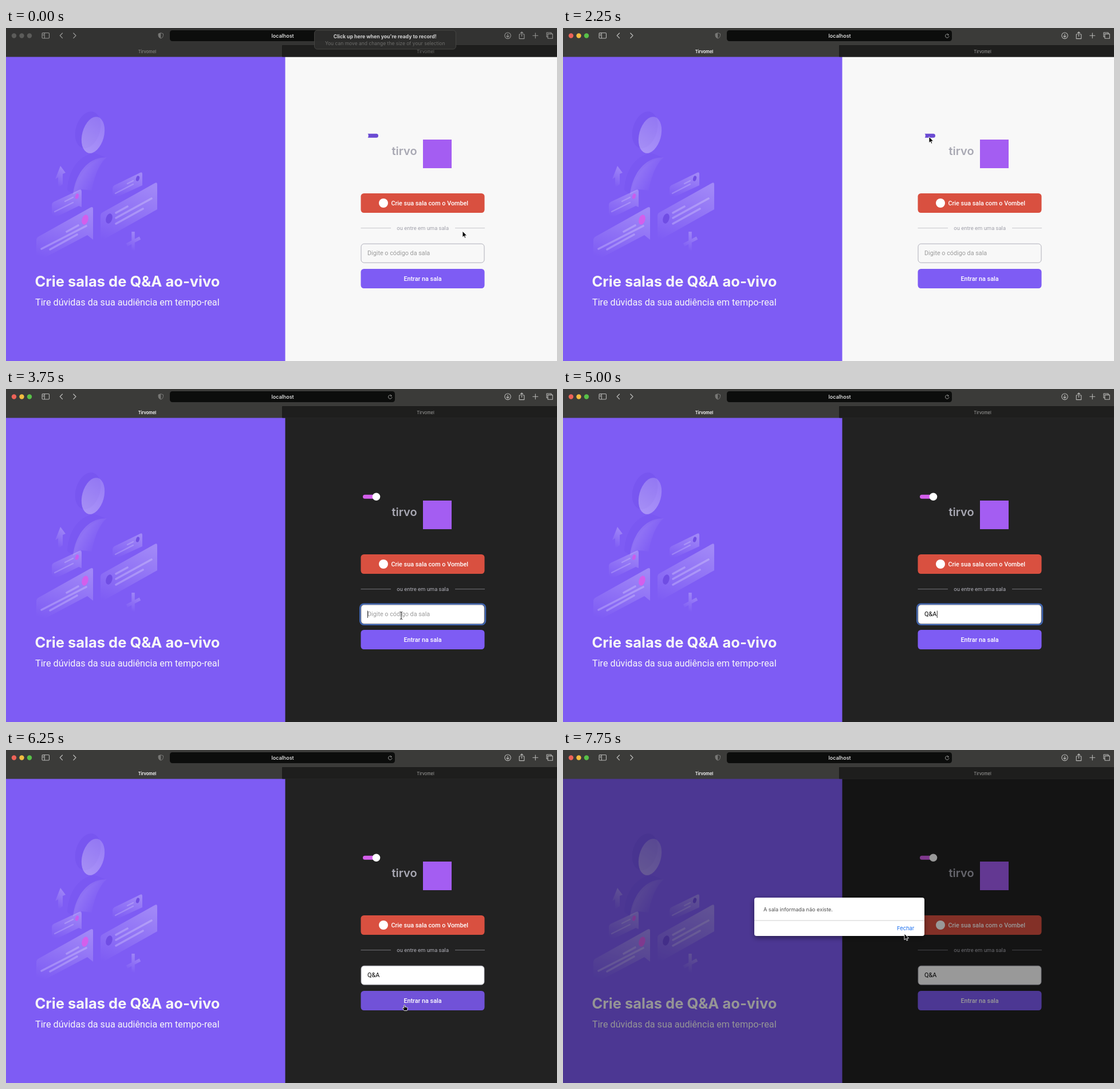
Animation of 962x582 px, one loop 8000 ms. Source, as an HTML page:

```html
<!DOCTYPE html>
<html lang="pt">
<head>
<meta charset="utf-8">
<title>Tirvomel</title>
<style>
html, body { margin: 0; width: 100%; height: 100%; overflow: hidden; background: #222; }
svg { display: block; width: 962px; height: 582px; }
text { font-family: Roboto, sans-serif; }
.ui { font-family: Inter, sans-serif; }
.mid { text-anchor: middle; }
</style>
</head>
<body>
<svg viewBox="0 0 962 582" xmlns="http://www.w3.org/2000/svg">
  <defs>
    <linearGradient id="fade" x1=".7" y1="0" x2=".4" y2="1">
      <stop offset="0" stop-color="#fff" stop-opacity=".27"/>
      <stop offset="1" stop-color="#fff" stop-opacity="0"/>
    </linearGradient>
    <linearGradient id="body" x1="0" y1=".2" x2=".75" y2=".65">
      <stop offset="0" stop-color="#fff" stop-opacity=".24"/>
      <stop offset="1" stop-color="#fff" stop-opacity="0"/>
    </linearGradient>
    <linearGradient id="head" x1=".6" y1="0" x2=".4" y2="1">
      <stop offset="0" stop-color="#fff" stop-opacity=".2"/>
      <stop offset="1" stop-color="#fff" stop-opacity=".34"/>
    </linearGradient>
    <filter id="shadow" x="-20%" y="-50%" width="140%" height="220%">
      <feDropShadow dx="0" dy="3" stdDeviation="5" flood-opacity=".45"/>
    </filter>
  </defs>

  <rect y="50" width="488" height="532" fill="#7e5cf4"/>
  <g id="art">
    <ellipse cx="143" cy="178" rx="21" ry="33" transform="rotate(17 143 178)" fill="#4a2bd0" opacity=".11"/>
    <ellipse cx="152" cy="187" rx="19" ry="32.5" transform="rotate(15 152 187)" fill="url(#head)"/>
    <path d="M107 283C108 250 128 220 156 219L174 226C145 230 125 258 117 291Z" fill="#4a2bd0" opacity=".08"/>
    <path d="M117 291C120 260 140 225 176 226C163 236 153 262 150 284L132 282Z" fill="url(#body)"/>
    <path d="M95 241L104 253L99 255V273L91 279V261L86 264Z" fill="url(#fade)"/>
    <path d="M80 309Q80 306 83 304L128 283Q132 281 132 286V313L127 311L80 334Z" fill="url(#fade)"/>
    <path d="M53 370Q53 367 56 365L147 314Q152 311 152 316V370L142 362L53 409Z" fill="url(#fade)"/>
    <path d="M165 328Q165 324 169 322L260 271Q264 269 264 273V317L175 367L165 382Z" fill="url(#fade)"/>
    <path d="M186 280Q186 277 189 275L234 253Q238 251 238 255V275L186 299Z" fill="url(#fade)"/>
    <path d="M222 356V389M211 379L234 367" stroke="url(#fade)" stroke-width="5.5" fill="none"/>
    <path d="M106 356L126 345M62 386L140 346M77 387L124 361M192 323L212 312M192 332L254 298M192 342L239 316"
      stroke="#fff" stroke-opacity=".23" stroke-width="3.6" stroke-linecap="round"/>
    <path d="M103 303L117 296M85 321L117 305M212 272L222 267M191 289L222 273"
      stroke="#fff" stroke-opacity=".2" stroke-width="2.4" stroke-linecap="round"/>
    <ellipse cx="138" cy="335" rx="5.4" ry="9" transform="rotate(17 138 335)" fill="#d35fec"/>
    <ellipse cx="124" cy="294" rx="2.9" ry="4.8" transform="rotate(17 124 294)" fill="#c95dee"/>
    <ellipse cx="180" cy="333" rx="5.4" ry="9" transform="rotate(17 180 333)" fill="#704de4"/>
    <ellipse cx="230" cy="263" rx="2.9" ry="4.8" transform="rotate(17 230 263)" fill="#704de4"/>
  </g>
  <text class="ui" x="50.5" y="452" font-size="25.5" font-weight="700" fill="#f8f8f8">Crie salas de Q&amp;A ao-vivo</text>
  <text x="51" y="485" font-size="16.2" fill="#f8f8f8">Tire dúvidas da sua audiência em tempo-real</text>

  <rect id="panel" x="487.5" y="50" width="474.5" height="532"/>
  <rect id="track" x="623" y="184.8" width="27" height="7" rx="3.5"/>
  <circle id="knob" cy="188.3" r="6.8"/>
  <text class="ui" x="673.5" y="222" font-size="20" font-weight="600" fill="#a8a8b3">tirvo</text>
  <rect x="728" y="195" width="50" height="50" fill="#a45df2"/>
  <rect x="619.5" y="289" width="216" height="34" rx="5.4" fill="#d95040"/>
  <circle cx="659" cy="306" r="8" fill="#fff"/>
  <text x="672.5" y="309.8" font-size="10.8" font-weight="500" fill="#fff">Crie sua sala com o Vombel</text>
  <path id="rules" d="M619.5 349.7H672M784 349.7H836" stroke-width="1"/>
  <text id="or" class="mid" x="727.7" y="353" font-size="9.45">ou entre em uma sala</text>
  <rect id="ring" x="618.2" y="375.7" width="218.8" height="36" rx="6.5" fill="none" stroke="#3f66b4" stroke-width="2.4"/>
  <rect id="box" x="620" y="377.2" width="215" height="33" rx="5.2" stroke="#a8a8b3" stroke-width=".9"/>
  <text id="entry" x="631" y="397.4" font-size="10.8"></text>
  <path id="caret" stroke="#000" stroke-width=".8"/>
  <rect id="enter" x="619.5" y="421" width="216" height="34" rx="5.4"/>
  <text class="mid" x="727.5" y="441.9" font-size="10.8" font-weight="500" fill="#fff">Entrar na sala</text>

  <g id="modal">
    <rect y="50" width="962" height="532" opacity=".4"/>
    <rect x="334" y="258" width="297" height="67" rx="4" fill="#fff" filter="url(#shadow)"/>
    <path d="M334 298H631" stroke="#cfcfcf" stroke-width="1"/>
    <text class="ui" x="350" y="282.3" font-size="9.1" fill="#4c4c4c">A sala informada não existe.</text>
    <text class="ui" x="583" y="315.4" font-size="9.4" fill="#1a6ff0">Fechar</text>
  </g>

  <rect id="bar" width="962" height="50.5"/>
  <path d="M482.5 30.5H962V50.5H482.5Z" fill="#1e1e1d"/>
  <path d="M482.5 30.5H962M482.5 30.5V50" stroke="#141414" stroke-width=".7" fill="none"/>
  <g id="lights"><circle cx="14"/><circle cx="27.5"/><circle cx="41"/></g>
  <rect x="286" y="4" width="393" height="19" rx="4.5" fill="#0c0d0c"/>
  <g id="icons" fill="none" stroke-width="1.1" stroke-linecap="round" stroke-linejoin="round">
    <path d="M64.5 8.5H74Q75.5 8.5 75.5 10V16.5Q75.5 18 74 18H64.5Q63 18 63 16.5V10Q63 8.5 64.5 8.5M67.3 8.5V18M64.5 11H65.8M64.5 13H65.8"/>
    <path d="M98.5 9L94.3 13.3L98.5 17.6M117.8 9L122 13.3L117.8 17.6" stroke-width="1.3"/>
    <circle cx="876" cy="13.3" r="5.3"/>
    <path d="M876 10.5V16M873.8 14L876 16.1L878.2 14"/>
    <path d="M898.2 11H896.2V18.6H904.8V11H902.8M900.5 14.5V6.8M898.3 9L900.5 6.8L902.7 9"/>
    <path d="M924.3 8.8V17.8M919.8 13.3H928.8"/>
    <path d="M946 15.5H944V8H952V10M946 10.4H954.3V18.3H946Z"/>
  </g>
  <path d="M270.3 8.5L274.5 10V13.5Q274.2 16.8 270.3 18.3Q266.4 16.8 266.1 13.5V10Z" fill="none" stroke="#777775"/>
  <path d="M270.3 8.5V18.3Q266.4 16.8 266.1 13.5V10Z" fill="#777775"/>
  <path d="M673.2 11.9A3.2 3.2 0 1 0 673.9 14.2M671 10.2L673.3 11.9L671.4 13.2" fill="none" stroke="#a9a9a7" stroke-width=".9"/>
  <text class="ui mid" x="483" y="17.3" font-size="9" font-weight="500" fill="#f2f2f2">localhost</text>
  <text id="tab" class="ui mid" x="246.5" y="43.5" font-size="7.4" font-weight="600">Tirvomel</text>
  <text id="tab2" class="ui mid" x="732.5" y="43.5" font-size="7.4">Tirvomel</text>

  <g id="tip">
    <rect x="538.5" y="4" width="247" height="33" rx="5" fill="#2d2d2c" fill-opacity=".94" stroke="#4c4c4a" stroke-width=".8"/>
    <text class="ui mid" x="661.7" y="18" font-size="8.7" font-weight="700" fill="#d2d2d2">Click up here when you're ready to record!</text>
    <text class="ui mid" x="661.7" y="30" font-size="8.5" fill="#6c6c6a">You can move and change the size of your selection</text>
  </g>

  <g id="cursor" stroke-linejoin="round">
    <path id="arrow" d="M0 0V10.8L2.5 8.5L4.1 12.2L5.9 11.4L4.3 7.9H7.7Z" fill="#000" stroke="#fff" stroke-width=".9"/>
    <path id="beam" d="M-2.2 -6.5Q0 -6.5 0 -5V5Q0 6.5 -2.2 6.5M2.2 -6.5Q0 -6.5 0 -5M0 5Q0 6.5 2.2 6.5" fill="none" stroke="#222" stroke-width="1"/>
    <path id="hand" d="M-.2 10L-3.2 6Q-3.4 4.6 -1.8 5L-.8 6V.8Q0 -.4 .9 .8V3.8Q2 3 2.6 4Q3.7 3.4 4.1 4.4Q5.6 4.2 5.6 5.6Q5.6 8.4 4.6 10Z" fill="#000" stroke="#fff" stroke-width=".9"/>
  </g>
</svg>
<script>
const LOOP = 8000, STEP = 250;
const $ = id => document.getElementById(id);
const set = (id, attrs) => { for (const k in attrs) $(id).setAttribute(k, attrs[k]); };
const show = (id, on) => set(id, { visibility: on ? 'visible' : 'hidden' });

// time, x, y of the pointer
const path = [
  [0, 797, 355], [1250, 690, 245], [2000, 639, 190], [2500, 639, 190],
  [3500, 690, 396], [5250, 690, 396], [5500, 745, 466], [5750, 714, 450],
  [6250, 695.5, 445.5], [6750, 695.5, 445.5], [7750, 596, 321]
];
const typing = [[4000, 'Q'], [4500, 'Q&'], [4750, 'Q&A']];
const caretX = { '': 631.5, 'Q': 639, 'Q&': 646, 'Q&A': 653.3 };

function pointer(t) {
  const i = path.findIndex(p => p[0] > t);
  if (i < 0) return path[path.length - 1].slice(1);
  const [t0, x0, y0] = path[i - 1], [t1, x1, y1] = path[i];
  const u = (t - t0) / (t1 - t0), e = u * u * (3 - 2 * u);
  return [x0 + (x1 - x0) * e, y0 + (y1 - y0) * e];
}

function shape(t) {
  if (t >= 4000 && t < 5250) return '';
  if ((t >= 3500 && t < 4000) || t === 5250) return 'beam';
  return t >= 5750 && t < 7000 ? 'hand' : 'arrow';
}

function render(t) {
  const active = t >= 1750, dark = t >= 2500;
  const focus = t >= 3750 && t < 6000;
  const page = dark ? '#222222' : '#f8f8f8';

  set('bar', { fill: active ? '#3b3b39' : '#333332' });
  set('icons', { stroke: active ? '#b9b9b7' : '#969694' });
  set('tab', { fill: active ? '#ffffff' : '#7b7b79' });
  set('tab2', { fill: active ? '#a2a2a0' : '#6c6c6a' });
  const colours = active ? ['#ed6358', '#f3bd40', '#58c148'] : Array(3).fill('#5c5c5a');
  [...$('lights').children].forEach((c, i) => {
    c.setAttribute('cy', 13.5);
    c.setAttribute('r', 4.2);
    c.setAttribute('fill', colours[i]);
  });
  show('tip', t < 250);

  set('panel', { fill: page });
  set('track', { fill: dark ? '#d45fec' : '#6b4bd3' });
  set('knob', { cx: dark ? 646.5 : 626, fill: dark ? '#fff' : page });
  set('rules', { stroke: dark ? '#77777c' : '#c4c4c9' });
  set('or', { fill: dark ? '#b1b1ba' : '#a0a0aa' });
  set('box', { fill: dark ? '#fff' : page });
  set('enter', { fill: t >= 5750 && t < 7000 ? '#7152d8' : '#7e5cf4' });

  const word = typing.reduce((w, [at, s]) => t >= at ? s : w, '');
  $('entry').textContent = word || 'Digite o código da sala';
  set('entry', { fill: word ? '#000' : '#9b9b9b' });
  show('ring', focus);
  show('caret', focus);
  set('caret', { d: `M${caretX[word]} 387.5V400` });

  show('modal', t >= 7000);
  const [x, y] = pointer(t), kind = shape(t);
  set('cursor', { transform: `translate(${x} ${y})` });
  for (const id of ['arrow', 'beam', 'hand']) show(id, id === kind);
}

const start = performance.now();
function tick() {
  const t = (performance.now() - start) % LOOP;
  render(Math.floor(t / STEP) * STEP);
  requestAnimationFrame(tick);
}
tick();
</script>
</body>
</html>
```
